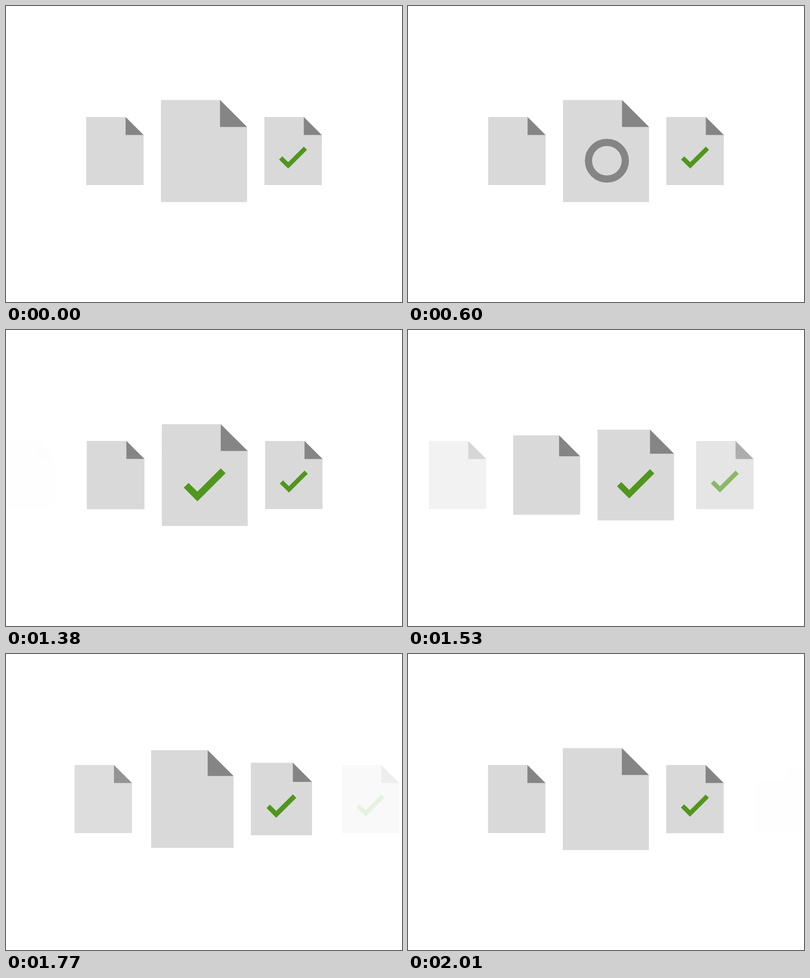
These frames come from a looping animation (800 px wide and 600 px high, 2040 ms). An HTML page:

```html
<!DOCTYPE html>
<html lang="en">
<head>
<meta charset="utf-8">
<title>Document queue</title>
<style>
  html, body { margin: 0; width: 100%; height: 100%; overflow: hidden; background: #fff; }
  svg { display: block; width: 100%; height: 100%; }
  .paper { fill: #d9d9d9; }
  .fold { fill: #858585; }
  .ring { fill: none; stroke: #858585; stroke-width: 9.7; }
  .check { fill: none; stroke: #50961e; stroke-width: 9.2; }
</style>
</head>
<body>
<svg viewBox="0 0 800 600">
  <defs>
    <g id="page">
      <path class="paper" d="M-58-69H21.6L58-32.6V69H-58Z"/>
      <path class="fold" d="M21.6-69L58-32.6H21.6Z"/>
    </g>
    <path id="tick" class="check" d="M-25.1 13.8L-9.9 29L24.9-5.8"/>
  </defs>
  <g class="doc"><use href="#page"/></g>
  <g class="doc"><use href="#page"/></g>
  <g class="doc">
    <use href="#page"/>
    <circle id="ring" class="ring" r="24.8" pathLength="100" transform="translate(1.2 13) rotate(-90)"/>
    <use id="done" href="#tick"/>
  </g>
  <g class="doc"><use href="#page"/><use href="#tick"/></g>
</svg>
<script>
const LOOP = 2040, STEP = 30;
const docs = document.querySelectorAll('.doc');
const ring = document.getElementById('ring');
const done = document.getElementById('done');

const progress = (t, start, length) => Math.min(1, Math.max(0, (t - start) / length));

// Cubic Bezier easing (0.302, 0, 0.252, 1), solved by bisection.
function ease(x) {
  if (x <= 0 || x >= 1) return x;
  let low = 0, high = 1, s;
  for (let i = 0; i < 30; i++) {
    s = (low + high) / 2;
    const r = 1 - s;
    if (3 * 0.302 * s * r * r + 3 * 0.252 * s * s * r + s ** 3 < x) low = s;
    else high = s;
  }
  return s * s * (3 - 2 * s);
}

function draw(t) {
  const trace = ease(progress(t, 0, 560));
  const swap = progress(t, 728, 202);
  const slide = ease(progress(t, 1348, 702));

  ring.setAttribute('stroke-dasharray', trace < 1 ? `${trace * 100} 200` : 'none');
  ring.setAttribute('opacity', trace > 0 ? 1 - swap : 0);
  done.setAttribute('opacity', swap);

  const scales = [1, 1 + slide / 2, 1.5 - slide / 2, 1];
  const opacities = [slide, 1, 1, 1 - slide];
  docs.forEach((doc, i) => {
    const x = 40 + 180 * (i + slide);
    doc.setAttribute('transform', `translate(${x} 294.1) scale(${scales[i]})`);
    doc.setAttribute('opacity', opacities[i]);
  });
}

function tick(now) {
  draw(Math.floor((now + 2) / STEP) * STEP % LOOP);
  requestAnimationFrame(tick);
}
draw(0);
requestAnimationFrame(tick);
</script>
</body>
</html>
```
